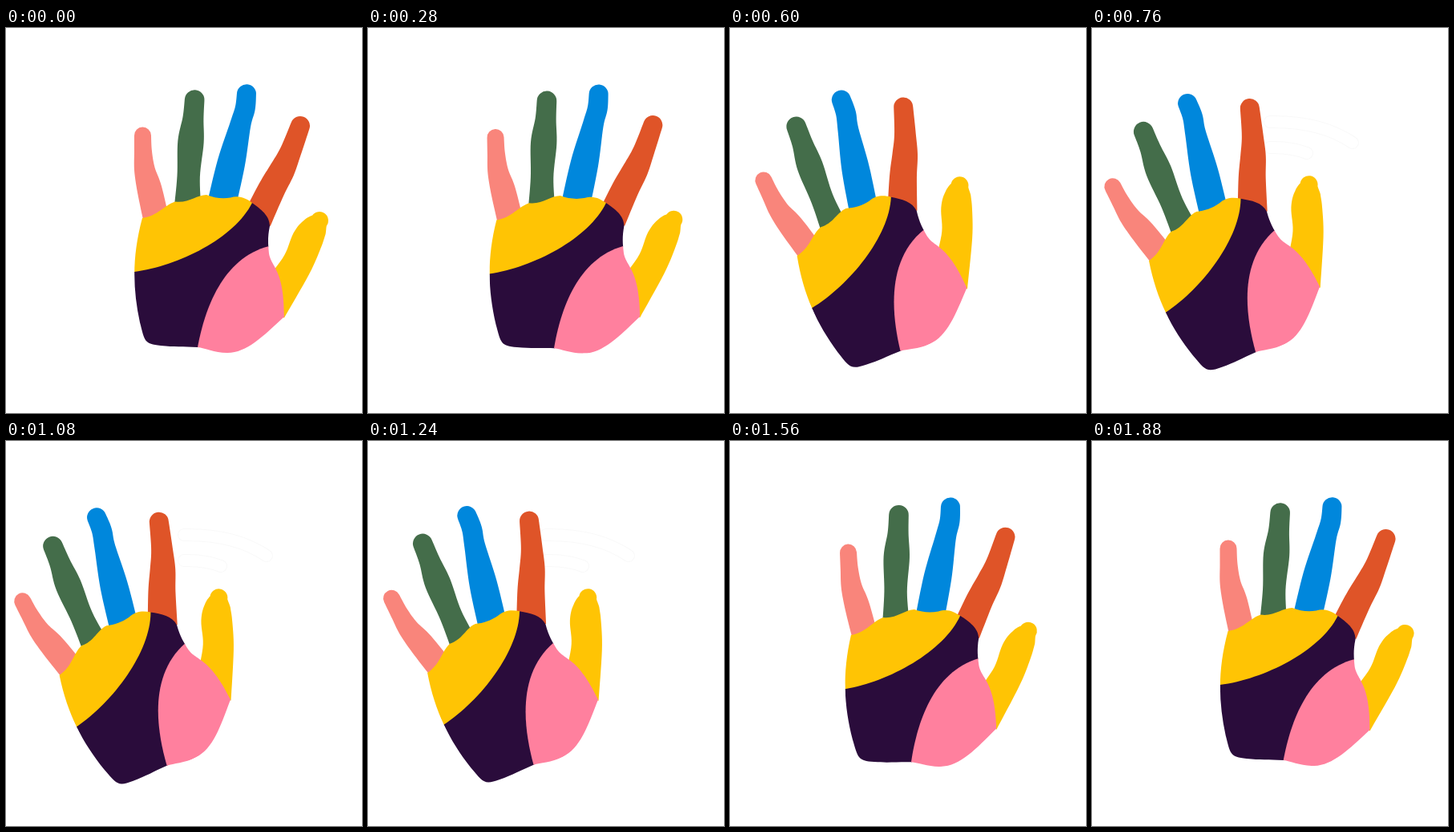
These frames come from a looping animation (444x480 px, 1.92 s). An HTML page:

```html
<!DOCTYPE html>
<html lang="en">
<head>
<meta charset="utf-8">
<title>Waving hand</title>
<style>
  html, body { margin: 0; width: 100%; height: 100%; overflow: hidden; background: #fff; }
  svg { display: block; width: 100%; height: 100%; }
  #streaks { fill: none; stroke-linecap: round; }
  .rim { stroke: #f9f9f9; stroke-width: 16; }
  .core { stroke: #fff; stroke-width: 14; }
</style>
</head>
<body>
<svg viewBox="0 0 444 480">
  <defs>
    <clipPath id="palm">
      <path d="M170 237 C190 234 197 221 211 216.5 C227 219 238 208 250 208
        C260 212 270 213 280 211.5 C292 208 300 213 307 218 C318 226 329 234 329 247
        C326 262 327 270 328 281 C331 299 347 300 347 360 C320 385 300 405 276 405
        C260 405 248 399 239 398 C220 397 210 398 193 396 C172 394 173 390 167 367
        C158 325 157 285 170 237Z"/>
    </clipPath>
    <path id="lines" d="M222 117 Q285 116 325 143 M222 149 Q248 148 268 156"/>
  </defs>
  <g id="streaks">
    <use href="#lines" class="rim"/>
    <use href="#lines" class="core"/>
  </g>
  <g id="hand">
    <g id="fingers"></g>
    <g clip-path="url(#palm)">
      <path fill="#ffc404" d="M150 306 L160 305 C215 298 286 263 308 218 L312 200 H150Z"/>
      <path fill="#2a0c3b" d="M150 305 L160 304 C215 297 285 262 307 218 L312 200 H370
        V265 L328 273 C271 288 249 351 240 398 L236 420 H150Z"/>
      <path fill="#ff809e" d="M235 420 L239 398 C248 350 270 287 328 272 L370 264 V420Z"/>
    </g>
  </g>
</svg>
<script>
const LOOP = 1920, HALF = LOOP / 2, STEP = 40, LAG = 14;
const SWING = -26.9, PIVOT = [239, 398], DRIFT = [-39.5, 7];

// each finger: colour, then knuckles from base to tip as [x, y, radius]
const fingers = [
  ['#f9857b', [188, 242, 16], [179, 201, 15.5], [173, 177, 13], [171, 154, 11], [170.5, 134, 10.5]],
  ['#446d4a', [226.5, 226, 17], [227.7, 185, 14.2], [230.5, 142, 16.2], [233.5, 112, 13], [235.2, 89.5, 12.3]],
  ['#0087dc', [268, 224, 18], [281, 168, 17.3], [292.5, 120, 13], [298.3, 100, 12.5], [300, 82.2, 12]],
  ['#df5428', [313, 239, 18.5], [331, 201.5, 17], [344.5, 177, 15.8], [355, 154, 13.4], [367, 122, 12]],
  ['#ffc404', [327, 348, 24], [361.5, 297, 19.3], [376, 264, 19.3], [385, 248.5, 16], [391, 240, 11]]
];

const byId = id => document.getElementById(id);

const catmull = (a, b, c, d, t) =>
  b + t / 2 * (c - a + t * (2 * a - 5 * b + 4 * c - d + t * (3 * (b - c) + d - a)));

// point and radius at position u along the knuckles
function along(knots, u) {
  const last = knots.length - 1;
  const i = Math.max(0, Math.min(last - 1, Math.floor(u)));
  const [a, b, c, d] = [i - 1, i, i + 1, i + 2].map(k => knots[Math.max(0, Math.min(last, k))]);
  return b.map((v, k) => catmull(a[k], v, c[k], d[k], u - i));
}

// outline of a tube of varying width with a round tip
function fingerPath(knots) {
  const left = [], right = [], end = knots.length - 1, tipRadius = knots[end][2];
  for (let u = 0; u <= end; u += 1 / 8) {
    const [x, y, r] = along(knots, u);
    const [x0, y0] = along(knots, u - .01), [x1, y1] = along(knots, u + .01);
    const scale = r / Math.hypot(x1 - x0, y1 - y0);
    const nx = (y1 - y0) * scale, ny = (x0 - x1) * scale;
    left.push([x + nx, y + ny]);
    right.unshift([x - nx, y - ny]);
  }
  return `M${left.join('L')}A${tipRadius} ${tipRadius} 0 0 1 ${right.join('L')}Z`;
}

byId('fingers').innerHTML = fingers
  .map(([color, ...knots]) => `<path fill="${color}" d="${fingerPath(knots)}"/>`).join('');

const glide = p => (1 - Math.cos(Math.PI * p)) / 2;
const snap = p => 1 / (1 + Math.exp(-32 * (p - .514)));

function draw(now) {
  const t = Math.floor(now % LOOP / STEP) * STEP;
  const p = Math.abs(1 - Math.abs(t - LAG - HALF) / HALF);   // 0 at rest, 1 at full swing
  const angle = SWING * (.2 * glide(p) + .8 * snap(p));
  const [dx, dy] = DRIFT.map(v => v * glide(p));
  byId('hand').setAttribute('transform', `translate(${dx} ${dy}) rotate(${angle} ${PIVOT})`);
  byId('streaks').setAttribute('visibility', p > .65 ? 'visible' : 'hidden');
}

const start = performance.now();
function tick() {
  draw(performance.now() - start);
  requestAnimationFrame(tick);
}
tick();
</script>
</body>
</html>
```
